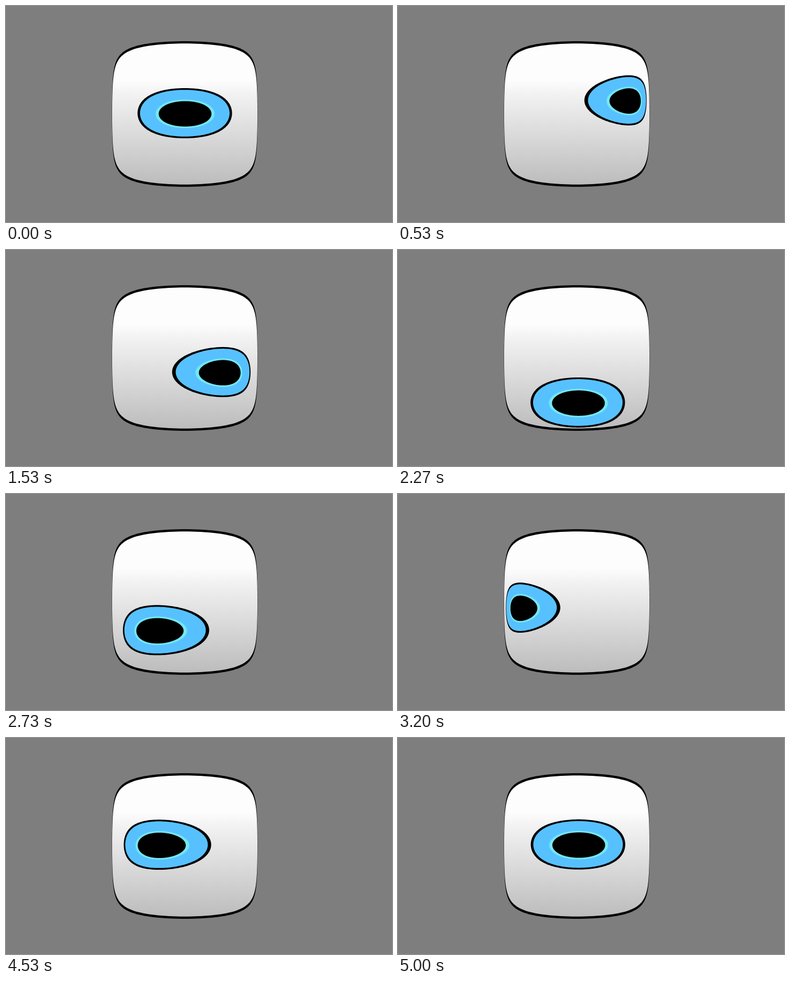
Recreate the animation shown at these times as an HTML page with a canvas. Size 720 px wide and 405 px high, loop 5.07 s.

```html
<!DOCTYPE html>
<html lang="en">
<head>
<meta charset="utf-8">
<title>Looking around</title>
<style>
  html, body { margin: 0; width: 100%; height: 100%; overflow: hidden; background: #7f7e7f; }
  canvas { display: block; width: 720px; height: 405px; }
</style>
</head>
<body>
<canvas id="stage" width="720" height="405"></canvas>
<script>
const ctx = document.getElementById("stage").getContext("2d");
const LOOP = 5070, STEP = 1000 / 15;
const CX = 333.5, CY = 202.5;
const REACH = 136.8;  // half width of the bulged surface
const FLAT = 72;      // flat pixels per unit of the bulge

// Gaze keys: time, sideways turn, height, and the two ease handles leading there
const keys = [
  { t: 0,    u: 0,     y: 201 },
  { t: 1070, u: 0.99,  y: 169,   ease: [0.33, 0.27] },
  { t: 2130, u: 0.025, y: 286.5, ease: [0.43, 0.39] },
  { t: 2200, u: 0.025, y: 286.5, ease: [0.33, 0.67] },
  { t: 3550, u: -1,    y: 201,   ease: [0.34, 0.61] },
  { t: 3690, u: -1,    y: 201,   ease: [0.33, 0.67] },
  { t: 5040, u: 0.025, y: 199.6, ease: [0.40, 0.66] }
];

function erf(x) {
  const a = Math.abs(x), k = 1 / (1 + 0.3275911 * a);
  const poly = ((((1.061405429 * k - 1.453152027) * k + 1.421413741) * k
    - 0.284496736) * k + 0.254829592) * k;
  return Math.sign(x) * (1 - poly * Math.exp(-a * a));
}

// Bezier ease (x1, 0, x2, 1), solved by bisection
function bezier(p, [x1, x2]) {
  let lo = 0, hi = 1;
  for (let i = 0; i < 24; i++) {
    const s = (lo + hi) / 2, r = 1 - s;
    const x = 3 * r * r * s * x1 + 3 * r * s * s * x2 + s * s * s;
    if (x < p) lo = s; else hi = s;
  }
  return lo * lo * (3 - 2 * lo);
}

function gaze(t) {
  const i = keys.findIndex(k => k.t > t);
  if (i < 0) return keys[keys.length - 1];
  const a = keys[i - 1], b = keys[i];
  const e = bezier((t - a.t) / (b.t - a.t), b.ease);
  return { u: a.u + (b.u - a.u) * e, y: a.y + (b.y - a.y) * e };
}

// A flat disc wrapped sideways around the bulge
function disc(u, y, r, fill) {
  const n = 240;
  ctx.beginPath();
  for (let i = 0; i < n; i++) {
    const a = i / n * Math.PI * 2;
    ctx.lineTo(CX + REACH * erf(u + Math.cos(a) * r / FLAT), y + Math.sin(a) * r);
  }
  ctx.closePath();
  ctx.fillStyle = fill;
  ctx.fill();
}

const shade = ctx.createLinearGradient(0, 70, 0, 336);
shade.addColorStop(0, "#fefdfe");
shade.addColorStop(0.26, "#fefdfe");
shade.addColorStop(0.36, "#f3f2f3");
shade.addColorStop(1, "#bdbcbd");

function draw(t) {
  ctx.fillStyle = "#7f7e7f";
  ctx.fillRect(0, 0, 720, 405);
  disc(0, CY, 136.5, "#000");
  disc(0, CY, 132.2, shade);

  const { u, y } = gaze(t);
  disc(u, y, 47, "#000");
  disc(u, y, 43.8, "#57c1ff");
  disc(u + 0.004, y + 1.2, 26.8, "#74e7f0");
  disc(u + 0.004, y + 1.2, 23.8, "#000");
}

function tick() {
  const t = performance.now() % LOOP;
  draw(Math.floor((t + 4) / STEP) * STEP % LOOP);
  requestAnimationFrame(tick);
}
tick();
</script>
</body>
</html>
```
